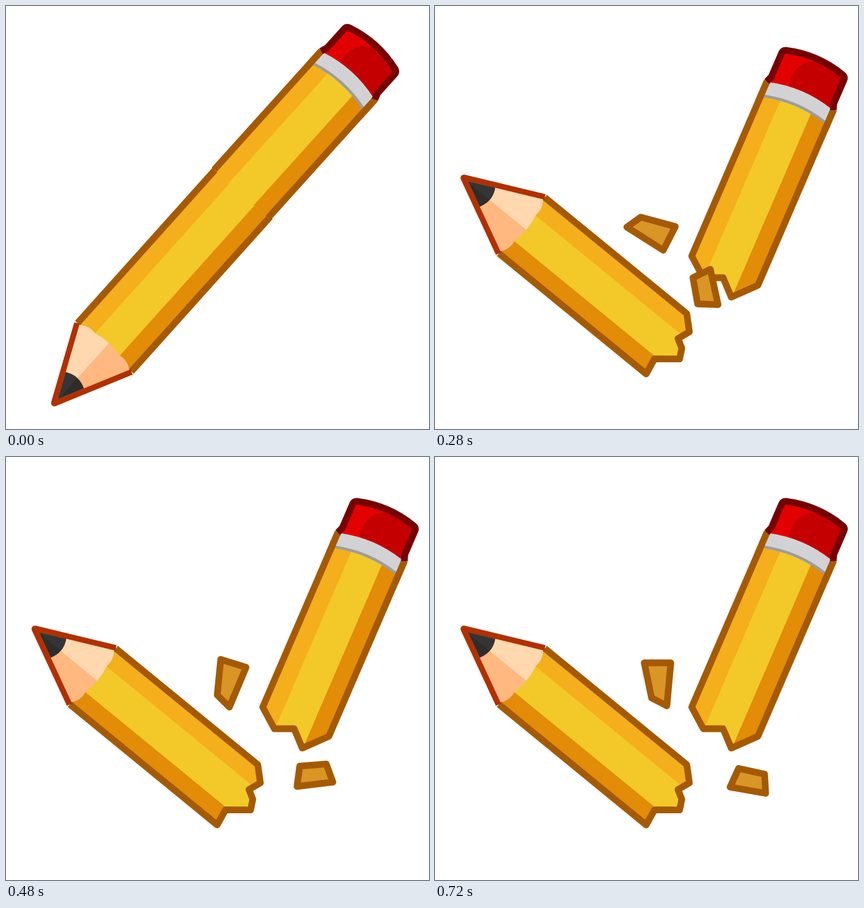
Animation, 748 px wide and 748 px high, one loop 2 s. Source, as an HTML page with a canvas:

```html
<!DOCTYPE html>
<html lang="en">
<head>
<meta charset="utf-8">
<title>Snapping pencil</title>
<style>
  html, body { margin: 0; width: 100%; height: 100%; overflow: hidden; background: #fff; }
  canvas { display: block; width: 100vw; height: 100vh; }
</style>
</head>
<body>
<canvas id="stage" width="748" height="748"></canvas>
<script>
const ctx = document.getElementById('stage').getContext('2d');
const LOOP = 2000, SNAP = 200, STEP = 40, LAST = 13, SPLIT = 3;
const LINE = 11.8, HALF = 64, BAND = 30, SHOULDER = 132.5;

const C = {
  edge: '#a55a02', light: '#f5ae1c', mid: '#f2c928', dark: '#e28c07',
  woodEdge: '#b23000', woodLight: '#ffd8b0', woodDark: '#ffb880',
  lead: '#353535', leadDark: '#302c2a',
  silver: '#d2d2d4', grey: '#9c9ca0',
  red: '#e30000', redDark: '#c40000', redEdge: '#760000', chip: '#d99526'
};

// Local axes: x runs along the pencil towards the eraser, y across it.
// Each part moves in a straight line and turns between two poses [x, y, degrees].
const tip = {
  from: [280.6, 484.8, -48.1], to: [277, 489, 39.3], centre: 292, cut: 500,
  jag: [[457, -HALF], [481, -42], [473, -20], [489, -11], [498, 6], [463.5, 34], [469, HALF]]
};
const top_ = {
  from: [501.6, 237, -47.95], to: [584.7, 300.4, -66.7], centre: -155, cut: -283,
  jag: [[-337, -HALF], [-364, -30], [-350, 2], [-376, 29], [-338, HALF]]
};
const chips = [
  { from: [370, 394.5, 243], to: [395, 398.5, 0],
    shape: [[-25, -34.5], [22, -34.5], [15, 41.5], [-12, 27.5]] },
  { from: [391.5, 421.5, -233], to: [556.8, 572.8, 0],
    shape: [[-20, -22], [26, -12], [28, 22], [-35, 11]] }
];

const mix = (a, b, w) => a.map((v, i) => v + (b[i] - v) * w);
const decay = k => 1 - Math.exp(-0.36 * k);

function place({ from, to, centre = 0 }, w, draw) {
  const [x, y, deg] = mix(from, to, w);
  ctx.save();
  ctx.translate(x, y);
  ctx.rotate(deg * Math.PI / 180);
  ctx.translate(-centre, 0);
  draw();
  ctx.restore();
}

function trace(points, close = true) {
  ctx.beginPath();
  points.forEach(([x, y]) => ctx.lineTo(x, y));
  if (close) ctx.closePath();
}

function fill(color) {
  ctx.fillStyle = color;
  ctx.fill();
}

function stroke(color) {
  ctx.strokeStyle = color;
  ctx.lineWidth = LINE;
  ctx.lineJoin = 'round';
  ctx.stroke();
}

function box(color, x, y, w, h) {
  ctx.fillStyle = color;
  ctx.fillRect(x, y, w, h);
}

function clipTo(path, draw) {
  ctx.save();
  path();
  ctx.clip();
  draw();
  ctx.restore();
}

// Striped barrel from its solid end to the break or the plain cut.
function barrel({ jag, cut }, x, whole) {
  const end = whole ? [[cut, -HALF], [cut, HALF]] : jag;
  const outline = [[x, -HALF], ...end, [x, HALF]];
  clipTo(() => trace(outline), () => {
    box(C.mid, -400, -HALF, 920, HALF * 2);
    box(C.light, -400, -HALF, 920, HALF - BAND + 1);
    box(C.dark, -400, BAND, 920, HALF - BAND);
  });
  if (whole) {
    for (const y of [-HALF, HALF]) {
      trace([[x, y], [cut, y]], false);
      stroke(C.edge);
    }
  } else {
    trace(outline, false);
    stroke(C.edge);
  }
}

// Cone from the point to x, closed by bulging scallops through the given edge points.
function cone(x, slope, edge, bulge) {
  ctx.beginPath();
  ctx.moveTo(9.5, 0);
  let [px, py] = [x, -(x - 9.5) * slope];
  ctx.lineTo(px, py);
  for (const [ex, ey] of [...edge, [x, -py]]) {
    ctx.quadraticCurveTo((px + ex) / 2 + bulge, (py + ey) / 2, ex, ey);
    [px, py] = [ex, ey];
  }
  ctx.closePath();
}

function twoTone(path, upper, lower) {
  clipTo(path, () => {
    box(lower, 0, -70, 160, 140);
    box(upper, 0, -70, 160, 71);
  });
}

function drawTip(whole) {
  barrel(tip, SHOULDER, whole);
  trace([[SHOULDER, -HALF], [0, 0], [SHOULDER, HALF]], false);
  stroke(C.woodEdge);
  const slope = HALF / SHOULDER;
  twoTone(() => cone(SHOULDER, slope, [[140, -BAND], [140, BAND]], 7), C.woodLight, C.woodDark);
  twoTone(() => cone(54, slope, [], 12), C.lead, C.leadDark);
}

// A strip of the ferrule with both ends bowed towards the eraser.
function ferrule(color, x0, x1) {
  const y = HALF - LINE / 2 + 1, bow = 16;
  ctx.beginPath();
  ctx.moveTo(x0, -y);
  ctx.quadraticCurveTo(x0 + bow, 0, x0, y);
  ctx.lineTo(x1, y);
  ctx.quadraticCurveTo(x1 + bow, 0, x1, -y);
  fill(color);
}

function eraserPath() {
  ctx.beginPath();
  ctx.moveTo(-1, -HALF);
  ctx.lineTo(10, -60);
  ctx.lineTo(56, -60);
  ctx.quadraticCurveTo(61, -60, 63, -55);
  ctx.quadraticCurveTo(79, 0, 63, 55);
  ctx.quadraticCurveTo(61, 60, 56, 60);
  ctx.lineTo(10, 60);
  ctx.lineTo(-1, HALF);
}

function drawEraser() {
  clipTo(eraserPath, () => {
    box(C.red, -5, -70, 90, 140);
    ctx.beginPath();
    ctx.moveTo(0, -24);
    ctx.bezierCurveTo(36, -34, 58, -22, 69, 8);
    ctx.lineTo(90, 70);
    ctx.lineTo(0, 70);
    fill(C.redDark);
  });
}

function drawTop(whole) {
  barrel(top_, 0, whole);
  drawEraser();
  ferrule(C.silver, -25, 0);
  ferrule(C.grey, -29, -24);
  for (const y of [-HALF, HALF]) {
    trace([[-40, y], [0, y]], false);
    stroke(C.edge);
  }
  eraserPath();
  stroke(C.redEdge);
}

function render(t) {
  const whole = t < SNAP;
  const k = whole ? -1 : Math.min(LAST, Math.floor((t - SNAP) / STEP));
  const turn = Math.min(1, (k + 1) / SPLIT);

  box('#fff', 0, 0, 748, 748);
  place(tip, turn, () => drawTip(whole));
  place(top_, turn, () => drawTop(whole));
  if (whole) return;
  for (const chip of chips) {
    place(chip, decay(k) / decay(LAST), () => {
      trace(chip.shape);
      fill(C.chip);
      stroke(C.edge);
    });
  }
}

const start = performance.now();
function tick() {
  render((performance.now() - start) % LOOP);
  requestAnimationFrame(tick);
}
tick();
</script>
</body>
</html>
```
